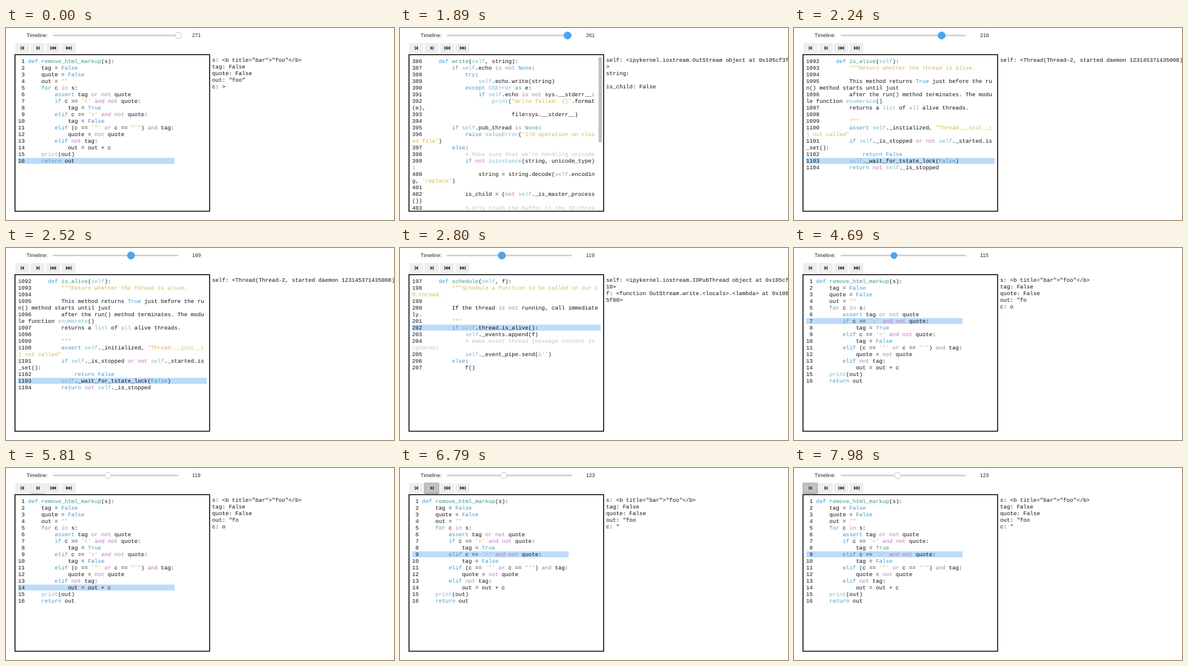
An HTML page that plays this animation: 640 px wide and 318 px high, repeating every 8000 ms.

```html
<!DOCTYPE html>
<html lang="en">
<head>
<meta charset="utf-8">
<title>Timeline debugger</title>
<style>
  html, body { margin: 0; width: 100%; height: 100%; overflow: hidden; background: #fff; }
  body { position: relative; text-rendering: geometricPrecision; }
  svg { position: absolute; left: 0; top: 0; }
  svg text { font: 8.6px "Liberation Sans", Arial, sans-serif; fill: #222; }
  #code { position: absolute; left: 15px; top: 44px; width: 320px; height: 259px; overflow: hidden; }
  .listing, #vars {
    position: absolute; font: 9.14px/11.05px "Liberation Mono", monospace; color: #111;
    white-space: pre-wrap; line-break: anywhere;
  }
  .listing { left: 5px; top: 5.5px; width: 311px; visibility: hidden; }
  .listing.narrow { width: 258px; }
  .listing.wrapped { width: 304px; }
  .listing.shown { visibility: visible; }
  .current { background: linear-gradient(#bddcfa, #bddcfa) 0 0 / 100% 10px no-repeat; }
  #vars { left: 340px; top: 47.8px; width: 315px; }
  .kw { color: #3f97c9; }
  .name { color: #3a9586; }
  .op { color: #b377b3; }
  .str { color: #d6b64f; }
  .builtin { color: #7ab6cd; }
  .note { color: #c2c2c2; }
  .button rect { fill: #eee; }
  .button.hover rect { filter: drop-shadow(0 1px 1px #0005); }
  .button.pressed rect { fill: #c3c3c3; stroke: #999; stroke-width: .8; }
  .button path { fill: #444; }
</style>
</head>
<body>
<div id="code"></div>
<div id="vars"></div>
<svg width="640" height="318" viewBox="0 0 640 318">
  <text x="34" y="15.2">Timeline:</text>
  <rect x="77" y="11.2" width="207" height="2.4" rx="1" fill="#c9c9c9"/>
  <circle id="thumb" cy="12.4"/>
  <text id="count" x="307" y="15.2"></text>
  <g id="buttons"></g>
  <rect x="14.8" y="44.2" width="321" height="259.3" fill="none" stroke="#111" stroke-width="1.6"/>
  <rect id="scrollbar" x="327.5" y="48" width="5.5" height="142" rx="2.7" fill="#c1c1c1"/>
</svg>
<script>
const $ = id => document.getElementById(id);
const LOOP = 8000, TICK = 70;

const scenes = {
  markup: { first: 1, style: 'narrow', code: String.raw`
def remove_html_markup(s):
    tag = False
    quote = False
    out = ""
    for c in s:
        assert tag or not quote
        if c == '<' and not quote:
            tag = True
        elif c == '>' and not quote:
            tag = False
        elif (c == '"' or c == "'") and tag:
            quote = not quote
        elif not tag:
            out = out + c
    print(out)
    return out` },
  write: { first: 386, style: 'wrapped',
    vars: 'self: <ipykernel.iostream.OutStream object at 0x105cf3f10>\nstring: \n\nis_child: False',
    code: String.raw`
    def write(self, string):
        if self.echo is not None:
            try:
                self.echo.write(string)
            except OSError as e:
                if self.echo is not sys.__stderr__:
                    print("Write failed: {}".format(e),
                          file=sys.__stderr__)

        if self.pub_thread is None:
            raise ValueError('I/O operation on closed file')
        else:
            # Make sure that we're handling unicode
            if not isinstance(string, unicode_type):
                string = string.decode(self.encoding, 'replace')

            is_child = (not self._is_master_process())
            # only touch the buffer in the IO thread` },
  alive: { first: 1092, line: 1103, style: 'full',
    vars: 'self: <Thread(Thread-2, started daemon 123145371435008)>',
    code: String.raw`
    def is_alive(self):
        """Return whether the thread is alive.

        This method returns True just before the run() method starts until just
        after the run() method terminates. The module function enumerate()
        returns a list of all alive threads.

        """
        assert self._initialized, "Thread.__init__() not called"
        if self._is_stopped or not self._started.is_set():
            return False
        self._wait_for_tstate_lock(False)
        return not self._is_stopped` },
  schedule: { first: 197, line: 202, style: 'full',
    vars: 'self: <ipykernel.iostream.IOPubThread object at 0x105cf3f10>\n' +
          'f: <function OutStream.write.<locals>.<lambda> at 0x108c15f80>',
    code: String.raw`
    def schedule(self, f):
        """Schedule a function to be called in our IO thread.

        If the thread is not running, call immediately.
        """
        if self.thread.is_alive():
            self._events.append(f)
            # Wake event thread (message content is ignored)
            self._event_pipe.send(b'')
        else:
            f()` }
};

const TOKENS = new RegExp([
  '(?<note>#.*)',
  '(?<str>"{3}.*|b?\'[^\']*\'|"[^"]*")',
  '(?<name>(?<=def )\\w+)',
  '(?<kw>\\b(?:def|for|assert|if|elif|else|try|except|as|raise|return|True|False|None)\\b)',
  '(?<op>\\b(?:and|or|not|in|is)\\b)',
  '(?<builtin>\\b(?:self|print|isinstance|enumerate|list|all|OSError|ValueError)\\b)'
].join('|'), 'g');

function highlight(line) {
  return line.replace(TOKENS, (token, ...rest) => {
    const groups = rest.at(-1);
    const kind = Object.keys(groups).find(k => groups[k] !== undefined);
    return `<span class="${kind}">${token.replace(/</g, '&lt;')}</span>`;
  });
}

for (const scene of Object.values(scenes)) {
  const lines = scene.code.slice(1).split('\n');
  scene.node = document.createElement('div');
  scene.node.innerHTML = lines.map((line, i) =>
    `<div>${String(scene.first + i).padStart(2)} ${highlight(line)}</div>`).join('');
  scene.base = `listing ${scene.style}`;
  $('code').append(scene.node);
}

// Icons are drawn around their own centre.
const LEFT = 'M-1.6 0L2.4 -3.4V3.4ZM-2.8 -3.3h1.3v6.6h-1.3Z';
const FAST_LEFT = 'M-3.6 0L.5 -3.4V3.4ZM.4 0L4.5 -3.4V3.4ZM-4.9 -3.3h1.3v6.6h-1.3Z';
const buttons = [[LEFT, 1], [LEFT, -1], [FAST_LEFT, 1], [FAST_LEFT, -1]].map(([icon, side], i) => {
  const x = 15.2 + i * 25.4;
  $('buttons').insertAdjacentHTML('beforeend',
    `<g class="button"><rect x="${x}" y="25" width="23.2" height="16.6"/>
     <path transform="translate(${x + 12} 33.2) scale(${side} 1)" d="${icon}"/></g>`);
  return $('buttons').lastElementChild;
});

const drag = [[1330, 271], [1890, 261], [2240, 218], [2800, 119], [3570, 119], [4340, 115]];
const forward = [5110, 5320, 5530, 5740, 6020, 6230, 6440, 6650, 6860, 7070];
const back = [7630, 7840, 8050];
const cuts = [[0, 'markup'], [1470, 'write'], [2030, 'schedule'], [2170, 'alive'],
  [2380, 'write'], [2520, 'alive'], [2730, 'schedule'], [2870, 'markup']];
const FIRST_STEP = 115;
const stepLines = [7, 9, 11, 13, 14, 5, 6, 7, 9, 11, 13];

const within = (t, from, to) => t >= from && t < to;
const clicked = (times, t) => times.filter(time => time <= t).length;
const pressing = (times, t) => times.some(time => within(t, time - 100, time));

function stepAt(t) {
  if (t <= drag[0][0]) return drag[0][1];
  const next = drag.findIndex(([time]) => time >= t);
  if (next < 0) return FIRST_STEP + clicked(forward, t) - clicked(back, t);
  const [t0, v0] = drag[next - 1], [t1, v1] = drag[next];
  return Math.round(v0 + (v1 - v0) * (t - t0) / (t1 - t0));
}

function markupVars(step) {
  const done = step > 200;
  const out = done ? '"foo"' : step >= 120 ? '"foo' : '"fo';
  const c = done ? '>' : step >= 121 ? '"' : 'o';
  return `s: <b title="bar">"foo"</b>\ntag: False\nquote: False\nout: ${out}\nc: ${c}`;
}

function drawThumb(t, step) {
  const blue = within(t, 910, 4900), dragging = within(t, 1400, 4480);
  const attrs = {
    cx: 77.2 + 0.763 * step, r: dragging ? 6 : 5.2,
    fill: blue ? '#4ba6f0' : '#fff', stroke: blue ? '#3f9be6' : '#b5b5b5', 'stroke-width': 0.8
  };
  for (const key in attrs) $('thumb').setAttribute(key, attrs[key]);
}

function draw(t) {
  const step = stepAt(t);
  const scene = scenes[cuts.findLast(([time]) => time <= t)[1]];
  const line = scene.line || (step > 200 ? 16 : stepLines[step - FIRST_STEP]);

  for (const other of Object.values(scenes))
    other.node.className = other.base + (other === scene ? ' shown' : '');
  [...scene.node.children].forEach((row, i) =>
    row.classList.toggle('current', scene !== scenes.write && scene.first + i === line));

  $('vars').textContent = scene.vars || markupVars(step);
  $('scrollbar').style.display = scene === scenes.write ? '' : 'none';
  $('count').textContent = step;
  drawThumb(t, step);

  buttons[0].classList.toggle('hover', t >= 7280);
  buttons[0].classList.toggle('pressed', pressing(back, t));
  buttons[1].classList.toggle('hover', within(t, 4970, 7210));
  buttons[1].classList.toggle('pressed', pressing(forward, t));
}

const start = performance.now();
function frame() {
  const t = Math.max(0, performance.now() - start) % LOOP;
  draw(Math.floor(t / TICK) * TICK);
  requestAnimationFrame(frame);
}
frame();
</script>
</body>
</html>
```
